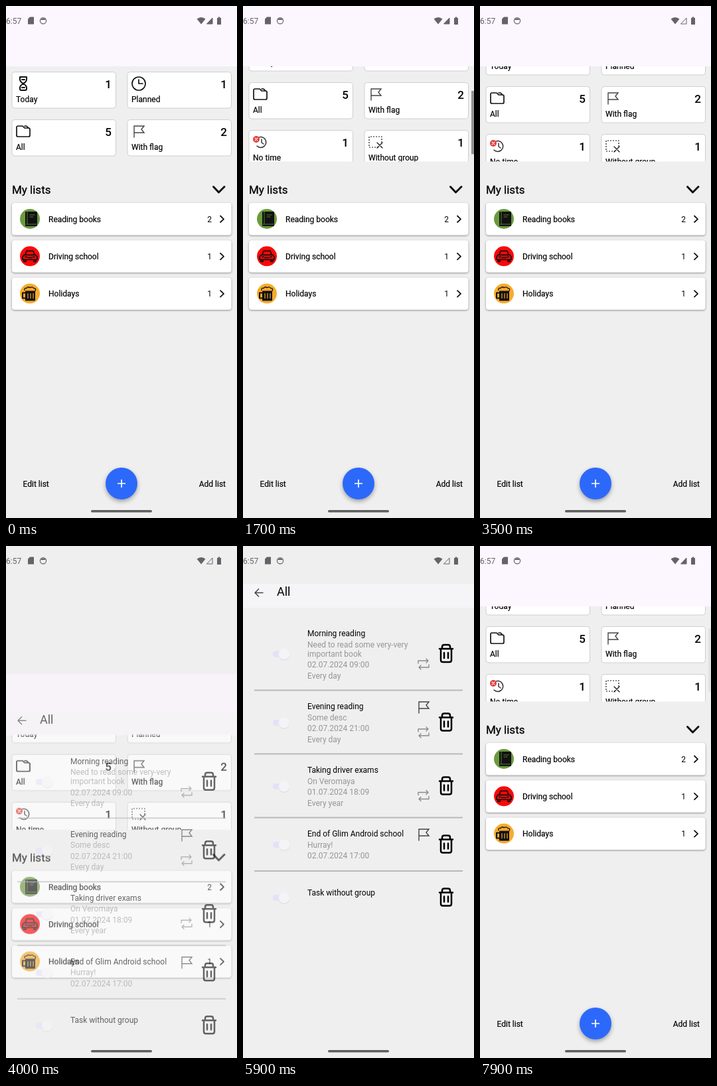
Recreate the animation shown at these times as an HTML page. Size 348 by 772 pixels, loop 8000 ms.

```html
<!DOCTYPE html>
<html lang="en">
<head>
<meta charset="utf-8">
<title>Task lists</title>
<style>
html, body { margin: 0; width: 100%; height: 100%; overflow: hidden; background: #efefef; }
svg { display: block; width: 100%; height: 100%; }
text { font: 12px Roboto, sans-serif; }
.label { stroke: #000; stroke-width: .2; }
.num { font-size: 17px; font-weight: 500; text-anchor: end; }
.head { font-size: 17px; stroke: #000; stroke-width: .3; }
.title { font-size: 18px; }
.sub { fill: #969696; }
.end { text-anchor: end; }
.line { fill: none; stroke: #111; stroke-width: 1.5; stroke-linecap: round; stroke-linejoin: round; }
.card { fill: #fff; stroke: #cfcfcf; }
.row { fill: #fff; filter: drop-shadow(0 1.5px 1.5px #0006); }
</style>
</head>
<body>
<svg id="stage" viewBox="0 0 348 772"></svg>
<script>
const LOOP = 8000, STEP = 100;
const at = (x, y, body) => `<g transform="translate(${x} ${y})">${body}</g>`;
const text = (x, y, s, cls = '') => `<text x="${x}" y="${y}" class="${cls}">${s}</text>`;
const line = (d, style = '') => `<path class="line" d="${d}" style="${style}"/>`;
const rect = (x, y, w, h, r, fill) => `<rect x="${x}" y="${y}" width="${w}" height="${h}" rx="${r}" fill="${fill}"/>`;
const disc = (x, y, r, fill) => `<circle cx="${x}" cy="${y}" r="${r}" fill="${fill}"/>`;

// Icons are drawn around their own centre.
const flag = line('M-7 9V-8H8L4 -3L8 2H-7', 'stroke:#444;stroke-width:1.4;stroke-linejoin:miter');
const icons = {
  hourglass: line('M-5 -10H5V-6Q5 -3 0 0Q-5 3 -5 6V8Q-5 10 -3 10H3Q5 10 5 8V6Q5 3 0 0Q-5 -3 -5 -6ZM-2 -6H2M-2 6H2', 'stroke-width:2'),
  clock: line('M-10 0A10 10 0 1 1 10 0A10 10 0 1 1 -10 0M0 -6V0H6', 'stroke-width:1.7'),
  folder: line('M-10 -6Q-10 -8 -8 -8H-1L2 -5H8Q10 -5 10 -3V6Q10 8 8 8H-8Q-10 8 -10 6ZM2 -8H5L8 -5', 'stroke-width:1.7'),
  flag: flag,
  noTime: line('M-4 -6A8 8 0 1 1 -5 6M2 -4V1L5 3', 'stroke:#333') + disc(-6, -4, 5, '#e33b3b') +
    line('M-8 -6L-4 -2M-4 -6L-8 -2', 'stroke:#fff;stroke-width:1.1'),
  noGroup: line('M4 8H-10V-8H9V2', 'stroke-dasharray:2 2;stroke-width:1.2;stroke-linecap:butt') +
    line('M2 1L10 9M10 1L2 9', 'stroke-width:1.2'),
  book: rect(-7, -11, 18, 22, 1, '#111') +
    line('M-4 -11V7M0 -6H7M0 -3H5M-6 8H10', 'stroke:#6b9a3e;stroke-width:.8'),
  car: line('M-7 -2L-5 -8H5L7 -2M-9 -2H9L11 1V5H-11V1ZM-9 5V8H-6V5M9 5V8H6V5M-7 1H-5M5 1H7M-3 2H3', 'stroke-width:1.8'),
  mug: rect(-7, -4, 15, 15, 1, '#111') + line('M-7 -1H-11V7H-7', 'stroke-width:2') +
    line('M-8 -5Q-9 -9 -5 -8Q-3 -11 0 -9Q4 -11 6 -8Q10 -8 8 -4', 'stroke-width:1.3') +
    line('M-3 0V7M1 0V7M5 0V7', 'stroke:#f7ab2c;stroke-width:1.2'),
  trash: line('M-10 -7H10M-6 -7V-10Q-6 -13 -3 -13H3Q6 -13 6 -10V-7M-8 -7V10Q-8 13 -5 13H5Q8 13 8 10V-7M-3 -1V7M3 -1V7', 'stroke:#000;stroke-width:2.5'),
  repeat: line('M-8 -1V-5H7M4 -8L7 -5L4 -2M8 1V5H-7M-4 2L-7 5L-4 8', 'stroke:#8b8b8b;stroke-width:1.4')
};

const cards = [
  ['Today', 1, 'hourglass'], ['Planned', 1, 'clock'],
  ['All', 5, 'folder'], ['With flag', 2, 'flag'],
  ['No time', 1, 'noTime'], ['Without group', 1, 'noGroup']
].map(([name, count, icon], i) => at(9 + i % 2 * 174, 99.5 + (i >> 1) * 72,
  '<rect class="card" width="156.5" height="54.5" rx="4"/>' +
  at(17, 17.5, icons[icon]) + text(6, 45, name, 'label') + text(150, 24.5, count, 'num'))).join('');

const lists = [
  ['Reading books', 2, 'book', '#6b9a3e'],
  ['Driving school', 1, 'car', '#fb0808'],
  ['Holidays', 1, 'mug', '#f7ab2c']
].map(([name, count, icon, color], i) => at(9, 297 + i * 56.3,
  '<rect class="row" width="330.5" height="48.5" rx="4"/>' +
  disc(27, 24, 15, color) + at(27, 24, icons[icon]) + text(55, 28.5, name, 'label') +
  text(301, 28.5, count, 'end') + line('M314 19.5L319 24.3L314 29', 'stroke-width:1.8'))).join('');

const home = rect(0, 0, 348, 91, 0, '#fcf6fe') +
  `<g clip-path="url(#view)"><g id="cards">${cards}</g></g>` +
  '<rect id="bar" x="344" width="4" height="95.5" fill="#939393"/>' +
  text(9, 283, 'My lists', 'head') + line('M312.5 272.5L320.5 281L329 272.5', 'stroke-width:3') + lists +
  text(25.5, 724.5, 'Edit list', 'label') + text(331, 724.5, 'Add list', 'label end') +
  '<circle cx="174" cy="720" r="24" fill="#2c69fb" style="filter:drop-shadow(0 3px 3px #0005)"/>' +
  line('M168 720H180M174 714V726', 'stroke:#fff;stroke-width:1.7;stroke-linecap:butt');

// Title, detail lines, baseline, control centre, divider, flagged, repeat centre
const tasks = [
  ['Morning reading', ['Need to read some very-very', 'important book', '02.07.2024 09:00', 'Every day'], 136, 162, 217.5, 0, 178],
  ['Evening reading', ['Some desc', '02.07.2024 21:00', 'Every day'], 246, 265.5, 313.5, 1, 281],
  ['Taking driver exams', ['On Veromaya', '01.07.2024 18:09', 'Every year'], 342, 361.5, 409.5, 0, 376.5],
  ['End of Glim Android school', ['Hurray!', '02.07.2024 17:00'], 438, 449.5, 490, 1, 0],
  ['Task without group', [], 526.5, 529.5, 0, 0, 0]
].map(([name, notes, y, mid, rule, flagged, repeat]) => {
  const gap = i => notes.length > 3 && i > 0 ? 14 + (i - 1) * 16.5 : i * 16.5;
  return text(97, y, name) +
    notes.map((s, i) => text(97, y + 16.7 + gap(i), s, 'sub')).join('') +
    rect(45, mid - 3.5, 16, 9, 4, '#e3e1fa') +
    disc(62, mid + 2, 8.5, '#dedee2') + disc(62, mid + 1, 8.3, '#f4f3f6') +
    at(306, mid, icons.trash) +
    (flagged ? at(272, y - 3, icons.flag) : '') +
    (repeat ? at(272, repeat, icons.repeat) : '') +
    (rule ? rect(17, rule - 1, 314, 2, 0, '#b9b9b9') : '');
}).join('');

const detail = rect(0, 57, 348, 36, 0, '#f5f4f6') +
  line('M30.5 70.5H18M24 64.5L18 70.5L24 76.5', 'stroke:#444;stroke-linecap:butt') +
  text(51, 75, 'All', 'title') + tasks;

const status = '<g fill="#66626a">' + text(0, 26.5, '6:57') +
  '<path d="M36 16.5H42V27.5H33V19.5Z"/><circle cx="56" cy="22.3" r="4.6" fill="none" stroke="#66626a" stroke-width="1.2"/>' +
  '<path d="M52 21A4.5 4.5 0 0 1 60 21Z"/>' +
  '<path d="M287.5 19.5Q294 14.5 300.5 19.5L294 27.5Z"/>' +
  '<path id="signal" d="M302.5 27L311 18V27Z" stroke="#66626a"/>' +
  '<path d="M318 18H319.7V16.5H322.3V18H324V28H318Z"/></g>' +
  rect(128, 760, 92, 3.6, 1.8, '#5f5f5f');

stage.innerHTML = '<clipPath id="view"><rect y="91" width="348" height="143.5"/></clipPath>' +
  `<g id="home">${home}</g><g id="detail">${detail}</g>` + status;
const el = id => document.getElementById(id);

// Piecewise linear value through [time, value] points
function along(points, t) {
  const i = points.findIndex(p => p[0] > t);
  if (i < 0) return points[points.length - 1][1];
  if (i === 0) return points[0][1];
  const [t0, a] = points[i - 1], [t1, b] = points[i];
  return a + (b - a) * (t - t0) / (t1 - t0);
}

const scroll = [[700, 0], [900, 12], [1100, 25], [1200, 25], [1500, 44], [1700, 56], [1900, 66],
  [2100, 71], [2400, 72.5], [2500, 72.5], [2600, 73], [2800, 73], [2900, 66], [3000, 55], [3100, 50]];
const barFade = [[700, 0], [800, 1], [3200, 1], [3500, 0], [6600, 0], [6700, 1], [7700, 1], [7800, .6], [7900, .15]];

// Critically damped spring from half the stage height to rest
function spring(ms) {
  const k = .21 + ms * .0147, y = 386 * (1 + k) * Math.exp(-k);
  return y < 1 || ms >= 500 ? 0 : y;
}

function move(id, y, alpha) {
  el(id).setAttribute('transform', `translate(0 ${y})`);
  el(id).setAttribute('opacity', alpha);
}

function draw(now) {
  const t = Math.floor(now % LOOP / STEP) * STEP;
  const s = along(scroll, t);
  el('cards').setAttribute('transform', `translate(0 ${-s})`);
  el('bar').setAttribute('y', 91 + s * .66);
  el('bar').setAttribute('opacity', along(barFade, t));
  el('signal').setAttribute('fill', t >= 2900 && t < 7000 ? 'none' : '#66626a');

  if (t < 3900) {
    move('home', 0, 1);
    move('detail', 0, 0);
  } else if (t < 6700) {
    const y = spring(t - 3900), left = Math.max(0, 1 - (t - 3900) / 500);
    move('home', y, left ** 2);
    move('detail', y, 1 - left ** 4);
  } else {
    move('home', spring(t - 6300), 1);
    move('detail', 379, t < 6800 ? .025 : 0);
  }
}

const start = performance.now();
function tick() {
  draw(performance.now() - start);
  requestAnimationFrame(tick);
}
tick();
</script>
</body>
</html>
```
